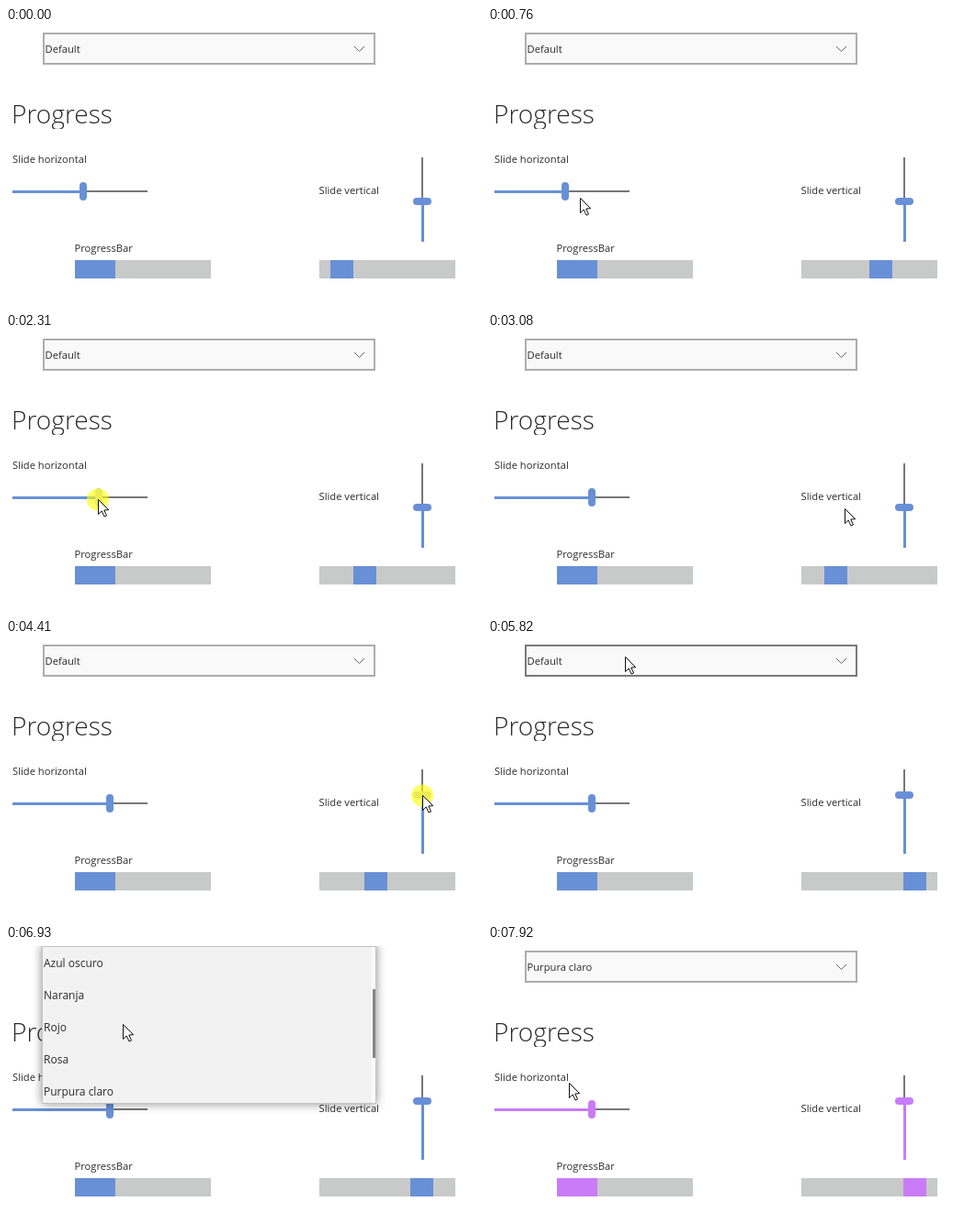
An HTML page with a canvas that plays this animation: 518 px wide and 303 px high, repeating every 7.99 s.

```html
<!DOCTYPE html>
<html lang="es">
<head>
<meta charset="utf-8">
<title>Progress controls</title>
<style>
html, body { margin: 0; width: 100%; height: 100%; overflow: hidden; background: #fff; }
canvas { display: block; }
</style>
</head>
<body>
<canvas id="stage" width="518" height="303"></canvas>
<script>
const ctx = document.getElementById("stage").getContext("2d");
const LOOP = 7990;
const BLUE = "#6890d6", PURPLE = "#c97bf8", TRACK = "#c8cac9", LINE = "#77777a", INK = "#2b2b2b";
const ITEMS = ["Default", "Azul claro", "Verde", "Azul oscuro", "Naranja", "Rojo", "Rosa",
  "Purpura claro", "Purpura oscuro", "Amarillo", "Gris"];
const ARROW = new Path2D("M0 0V16L3.7 12.5L6.5 18.5L9 17.5L6.3 11.5L11.2 11.2Z");

// The pointer rests between moves; each one ends at (x, y)
const ENTRY = { x: 407, y: 303 };
const MOVES = [
  { from: 200, to: 850, x: 84, y: 179 },
  { from: 1450, to: 1900, x: 52, y: 180 },
  { from: 1950, to: 2450, x: 112, y: 180 },
  { from: 2700, to: 3070, x: 388, y: 190 },
  { from: 3120, to: 3320, x: 453, y: 190 },
  { from: 3750, to: 4400, x: 453, y: 169 },
  { from: 5180, to: 5750, x: 149, y: 18 },
  { from: 6050, to: 6700, x: 127, y: 85 },
  { from: 6950, to: 7300, x: 76, y: 158 },
  { from: 7710, to: 7900, x: 88, y: 149 }
];
const H_DRAG = { from: 1400, to: 2690 };
const V_DRAG = { from: 3600, to: 4750 };
const OPEN_CLICK = { from: 5870, to: 5955 };
const PICK_CLICK = { from: 7400, to: 7490 };
const PRESSES = [H_DRAG, V_DRAG, OPEN_CLICK, PICK_CLICK];
const POPUP = { from: 5950, to: 7500 };
const SCROLL = { from: 6100, to: 6650 };

const clamp = (v, lo, hi) => Math.max(lo, Math.min(hi, v));
const within = (t, span) => t >= span.from && t < span.to;
const progress = (t, span) => clamp((t - span.from) / (span.to - span.from), 0, 1);
const ease = p => p * p * (3 - 2 * p);

function pointerAt(t) {
  return MOVES.reduce((at, move) => {
    const p = ease(progress(t, move));
    return { x: at.x + (move.x - at.x) * p, y: at.y + (move.y - at.y) * p };
  }, ENTRY);
}

// A thumb follows the pointer only while it is dragged
const dragged = (t, span) => pointerAt(clamp(t, span.from, span.to - 10));

// The picture refreshes about every 70 ms, with two pauses
function hold(t) {
  if (t < 130) return 0;
  if (t >= 6930) return 6930 + Math.floor((t - 6926) / 70.7) * 70.7;
  return Math.min(6800, 130 + Math.floor((t - 126) / 70.2) * 70.2);
}

function box(x, y, w, h, color) {
  ctx.fillStyle = color;
  ctx.fillRect(x, y, w, h);
}

function pill(x, y, w, h, color) {
  ctx.fillStyle = color;
  ctx.beginPath();
  ctx.roundRect(x, y, w, h, 4);
  ctx.fill();
}

function clipped(x, y, w, h, paint) {
  ctx.save();
  ctx.beginPath();
  ctx.rect(x, y, w, h);
  ctx.clip();
  paint();
  ctx.restore();
}

function label(text, x, y, size = 11.2, weight = 400) {
  ctx.font = `${weight} ${size}px "Open Sans", sans-serif`;
  ctx.fillStyle = INK;
  ctx.fillText(text, x, y);
}

function combo(text, hover) {
  box(40, 5, 362, 35, hover ? "#7a7a7c" : "#adadad");
  box(42, 7, 358, 31, "#f9f9f9");
  label(text, 42.5, 27);
  ctx.strokeStyle = "#666";
  ctx.lineWidth = 1;
  ctx.stroke(new Path2D("M379 20L384.5 25.5L390 20"));
}

function labels() {
  clipped(0, 70, 200, 40, () => label("Progress", 6, 104, 28.1, 350));
  label("Slide horizontal", 7, 147);
  label("Slide vertical", 340.5, 181);
  label("ProgressBar", 74.5, 244);
}

function sliders(hx, vy, accent, hColor, vColor) {
  box(7, 177, 147, 2, LINE);
  box(7, 177, hx - 7, 3, accent);
  pill(hx - 4, 168, 8, 20, hColor);
  box(452, 141, 2, 92, LINE);
  box(452, vy, 3, 233 - vy, accent);
  pill(443, vy - 4, 20, 8, vColor);
}

// The block bounces between the ends in ten steps each way
function bars(t, accent) {
  box(75, 253, 148, 20, TRACK);
  box(75, 253, 44, 20, accent);
  box(341, 253, 148, 20, TRACK);
  const phase = (19 + Math.floor((t + 43.5) / 52.25)) % 20;
  const step = 10 - Math.abs(10 - phase);
  const left = Math.round(341 + step * 148 / 12);
  box(left, 253, Math.min(25, 489 - left), 20, accent);
}

function popup(scrolled) {
  ctx.save();
  ctx.shadowColor = "rgba(0,0,0,.45)";
  ctx.shadowBlur = 10;
  box(39, -2, 364, 174, "#c2c2c2");
  ctx.restore();
  box(40, 1, 362, 170, "#f2f2f2");
  box(398, 1, 4, 170, "#fcfcfc");
  box(399, 1 + scrolled * 46, 3, 75, "#84868c");
  clipped(40, 1, 358, 170, () =>
    ITEMS.forEach((item, i) => label(item, 41, 23 + (i - scrolled * 3) * 35, 12)));
}

function highlight({ x, y }) {
  ctx.fillStyle = "rgba(255,255,0,.6)";
  ctx.beginPath();
  ctx.arc(x, y + .5, 12, 0, Math.PI * 2);
  ctx.fill();
}

function arrow({ x, y }) {
  ctx.save();
  ctx.translate(Math.round(x) + .5, Math.round(y) + .5);
  ctx.fillStyle = "#fff";
  ctx.strokeStyle = "#111";
  ctx.lineWidth = 1;
  ctx.fill(ARROW);
  ctx.stroke(ARROW);
  ctx.restore();
}

function draw(t) {
  const at = pointerAt(t);
  const hx = dragged(t, H_DRAG).x + (t > H_DRAG.from ? 1 : 0);
  const vy = dragged(t, V_DRAG).y - (t > V_DRAG.from ? 0 : 1);
  const pressed = PRESSES.some(span => within(t, span));
  const chosen = t >= POPUP.to;
  const accent = chosen ? PURPLE : BLUE;
  const over = (x, y, w, h) => Math.abs(at.x - x) <= w && Math.abs(at.y - y) <= h;
  const thumb = hover => !hover ? accent : pressed ? "#ccc" : "#1f1f1f";

  box(0, 0, 518, 303, "#fff");
  combo(chosen ? "Purpura claro" : "Default", over(221, 22, 181, 17));
  labels();
  sliders(hx, vy, accent, thumb(over(hx, 178, 4, 10)), thumb(over(453, vy, 10, 4)));
  bars(t, accent);
  if (within(t, POPUP)) popup(ease(progress(t, SCROLL)));
  if (pressed) highlight(at);
  if (t > MOVES[0].from) arrow(at);
}

const start = performance.now();
function tick() {
  draw(hold((performance.now() - start) % LOOP));
  requestAnimationFrame(tick);
}
tick();
</script>
</body>
</html>
```
